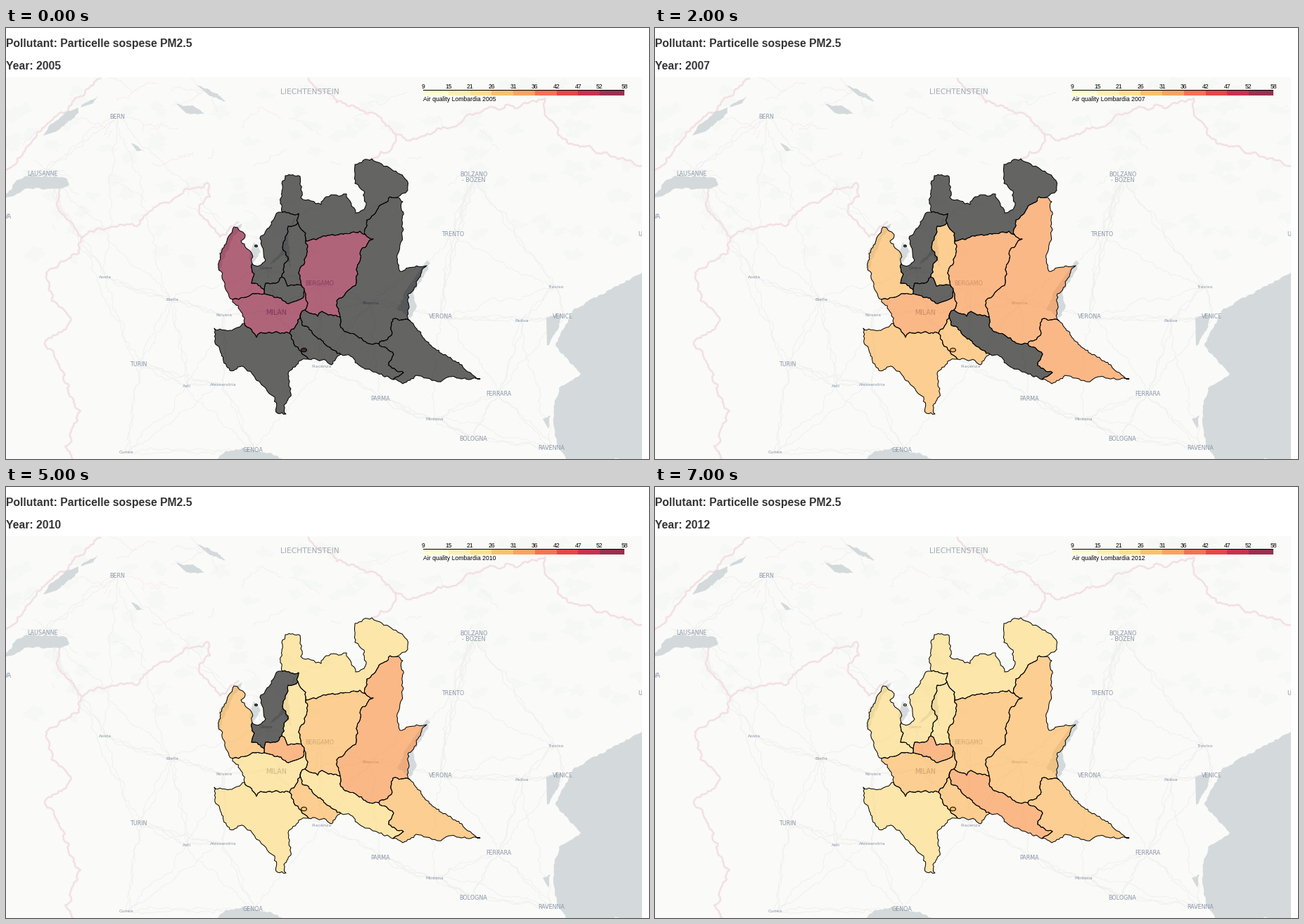
A matplotlib script for the animation above (8 s loop, 914 px wide and 613 px high).

```python
import numpy as np
import matplotlib.pyplot as plt
from matplotlib.animation import FuncAnimation
from matplotlib.patches import Polygon, Rectangle

W, H, DPI = 914, 613, 64
MAP_TOP, MAP_RIGHT = 70, 904
PT = 72 / DPI  # points per pixel
RAMP = ["#ffffcc", "#ffeda0", "#fed976", "#feb24c", "#fd8d3c",
        "#fc4e2a", "#e31a1c", "#bd0026", "#800026"]
INK = "#8b97a9"
rng = np.random.default_rng(5)

fig = plt.figure(figsize=(W / DPI, H / DPI), dpi=DPI, facecolor="white")
ax = fig.add_axes([0, 0, 1, 1])
ax.set_xlim(0, W)
ax.set_ylim(H, 0)
ax.axis("off")


def rough(flat, limit=2, fine=5):
    """Jagged line: displace midpoints until every step is short."""
    pts = np.array(flat, float).reshape(-1, 2)
    while True:
        step = np.diff(pts, axis=0)
        size = np.hypot(*step.T)
        if size.max() < fine:
            return pts
        out = [pts[0]]
        for p, q, d, s in zip(pts, pts[1:], step, size):
            if s >= fine:
                shift = rng.uniform(-1, 1) * min(0.25 * s, limit)
                out.append((p + q) / 2 + shift * np.array([-d[1], d[0]]) / s)
            out.append(q)
        pts = np.array(out)


def area(pts, color, z, **kw):
    return ax.add_patch(Polygon(pts, closed=True, fc=color, zorder=z, **kw))


def line(pts, color, width, z, **kw):
    ax.plot(*np.asarray(pts).T, color=color, lw=width * PT, zorder=z, **kw)


def text(x, y, s, px, color, font="DejaVu Sans", z=1.5, **kw):
    """Text whose capitals are centred on y."""
    return ax.text(x, y + 0.36 * px, s, fontsize=px * PT, color=color,
                   family=font, va="baseline", zorder=z, **kw)


def box(x, y, w, h, color, z, **kw):
    ax.add_patch(Rectangle((x, y), w, h, fc=color, lw=0, zorder=z, **kw))


# ---- base map -------------------------------------------------------------
box(0, MAP_TOP, MAP_RIGHT, H - MAP_TOP, "#fafaf8", 0)

CITIES = {"BERN": (158, 126), "LAUSANNE": (52, 207), "BOLZANO": (665, 208),
          "- BOZEN": (665, 216), "TRENTO": (635, 293), "BERGAMO": (446, 363),
          "VERONA": (618, 410), "VENICE": (792, 410), "TURIN": (188, 478),
          "PARMA": (532, 527), "FERRARA": (700, 520), "BOLOGNA": (664, 584),
          "RAVENNA": (775, 597), "GENOA": (351, 600)}
TOWNS = {"Como": (370, 341), "Brescia": (518, 391), "Aosta": (141, 354),
         "Biella": (236, 386), "Novara": (310, 408), "Asti": (257, 509),
         "Alessandria": (309, 507), "Piacenza": (449, 481),
         "Cuneo": (171, 603), "Modena": (609, 556), "Padua": (733, 416),
         "Treviso": (781, 368)}
MILAN = (384, 404.5)

# pale woodland and valley lines over the mountains
angle = np.linspace(0, 2 * np.pi, 12)
for _ in range(120):
    x, y = rng.uniform(0, MAP_RIGHT), rng.uniform(75, 330)
    r = rng.uniform(3, 12, 12)
    area(np.c_[x + 1.5 * r * np.cos(angle), y + r * np.sin(angle)], "#f6f8f5", 0.2)
for _ in range(30):
    x, y = rng.uniform(20, 850), rng.uniform(80, 300)
    end = x + rng.uniform(-60, 60), y + rng.uniform(-30, 30)
    line(rough([x, y, *end], 4), "#eeeff0", 0.8, 0.4)
for _ in range(12):
    x, y = rng.uniform(90, 400), rng.uniform(80, 190)
    end = x + rng.uniform(-70, 70), y + rng.uniform(-40, 40)
    line(rough([x, y, *end], 6), "#f3e2e3", 0.8, 0.6, ls=(0, (3, 2)))

# roads join each town to its nearest neighbours
places = np.array([*CITIES.values(), *TOWNS.values(), MILAN])
for p in places:
    near = np.argsort(np.hypot(*(places - p).T))[1:5]
    for q in places[near]:
        line(rough([*p, *q], 4, 8), "#efefed", 0.9, 0.5)


def border(*flat):
    shape = rough(flat, 4)
    line(shape, "#f7ebec", 3, 0.7)
    line(shape, "#f1dcdf", 1.3, 0.8)


def water(*flat):
    area(rough(flat, 1.5), "#d4dadc", 0.9, lw=0)


border(134, 72, 104, 98, 42, 156, 0, 202)
border(74, 214, 75, 260, 108, 298, 104, 320, 57, 348, 65, 388, 92, 412, 55, 450,
       70, 470, 106, 545, 84, 595, 95, 613)
border(108, 298, 130, 285, 186, 282, 210, 255, 286, 220, 290, 240, 275, 256,
       304, 297, 330, 276)
border(430, 72, 470, 106, 518, 120, 553, 150, 575, 160, 640, 140, 668, 121,
       766, 100, 772, 130, 800, 165, 850, 177, 904, 196)
border(553, 150, 548, 172, 520, 186)

water(904, 348, 888, 357, 840, 383, 808, 399, 781, 452, 817, 492, 786, 512,
      779, 542, 780, 580, 796, 614, 904, 614)
water(768, 412, 790, 407, 784, 430, 769, 452)
water(763, 556, 774, 551, 771, 570)
water(298, 614, 316, 602, 336, 597, 372, 605, 394, 614)
water(0, 236, 16, 216, 36, 209, 84, 213, 90, 223, 76, 229, 30, 228, 0, 241)
water(53, 153, 60, 141, 88, 118, 103, 113, 103, 121, 72, 147)
water(106, 113, 130, 97, 124, 107)
water(178, 164, 197, 175, 186, 175)
water(270, 80, 296, 92, 312, 104, 290, 97)
water(242, 108, 268, 112, 282, 122, 256, 121)
water(598, 331, 603, 335, 579, 378, 584, 395, 575, 412, 556, 400, 566, 376)
water(340, 276, 322, 298, 304, 346, 300, 340, 303, 320, 324, 284)
water(410, 270, 399, 292, 405, 340, 395, 322, 374, 340, 393, 312)
water(352, 305, 362, 318, 350, 334, 346, 324)

for names, px in ((CITIES, 8), (TOWNS, 6.4)):
    for name, (x, y) in names.items():
        text(x, y, name, px, INK, ha="center")
text(*MILAN, "MILAN", 9.5, "#7f8b9d", ha="center")
text(431.5, 89.9, "LIECHTENSTEIN", 10.8, "#a3abb5", ha="center")
text(8, 267.5, "VA", 8.6, INK, ha="right")
text(898.5, 293, "U", 8, INK)

# ---- provinces: shared edges between named corner points -------------------
NODES = {"a": (393, 262), "b": (415, 277), "c": (426, 303), "d": (511, 294),
         "e": (556, 241), "f": (350, 335), "g": (367, 372), "h": (367, 378),
         "i": (322, 386), "j": (339, 420), "k": (392, 354), "l": (421, 368),
         "m": (424, 374), "n": (425, 401), "o": (419, 406), "p": (403, 434),
         "q": (430, 471), "r": (476, 464), "s": (475, 411), "t": (530, 449),
         "u": (550, 500), "v": (574, 416)}
edges = {}


def edge(ends, *flat):
    start, stop = ends
    pts = rough([*NODES[start], *flat, *NODES[stop]])
    edges[ends], edges[stop + start] = pts, pts[::-1]


# outer edges
edge("ae", 392, 221, 397, 210, 418, 211, 419, 241, 448, 251, 455, 240, 484, 236,
     497, 263, 511, 254, 509, 232, 496, 221, 496, 194, 520, 186, 548, 201,
     570, 217, 571, 231)
edge("ev", 564, 247, 565, 287, 556, 323, 560, 346, 598, 338, 572, 378)
edge("vu", 582, 426, 610, 456, 648, 479, 674, 499, 630, 496, 613, 503, 583, 494,
     564, 506)
edge("ur", 505, 482, 490, 467)
edge("rq", 463, 479, 455, 473)
edge("qj", 416, 474, 401, 492, 405, 520, 395, 537, 398, 549, 386, 548, 382, 525,
     350, 492, 338, 482, 318, 487, 298, 450, 296, 427, 318, 430)
edge("ji", 336, 406)
edge("if", 302, 341, 304, 321, 324, 283, 340, 294, 334, 303, 350, 322)
edge("fa", 360, 338, 369, 330, 361, 299, 387, 262)
# inner edges
edge("ab", 416, 264)
edge("bc", 426, 292)
edge("cd", 455, 296, 503, 289)
edge("de", 513, 273, 546, 240)
edge("bk", 401, 282, 393, 312, 401, 326)
edge("kg", 383, 363, 369, 363)
edge("fg", 353, 350, 349, 363)
edge("cl", 426, 326, 418, 352)
edge("kl", 400, 367)
edge("lm")
edge("mh", 422, 384, 404, 391)
edge("gh")
edge("hi", 355, 378)
edge("ds", 522, 300, 505, 315, 497, 366, 470, 388)
edge("ns", 443, 410, 449, 403)
edge("mn", 429, 391)
edge("no")
edge("op", 411, 425)
edge("pj", 362, 433, 356, 440)
edge("or", 424, 424, 442, 440)
edge("pq", 409, 449)
edge("st", 476, 426, 513, 448)
edge("tu", 551, 464, 544, 480, 565, 490)
edge("tv", 548, 437, 550, 414)

# corners around VA, CO, SO, LC, BG, BS, MB, MI, LO, PV, CR, MN
RINGS = ["fghif", "abkgfa", "aedcba", "bclkb", "cdsnmlc", "evtsde", "klmhgk",
         "ihmnopji", "orqpo", "jpqj", "nsturon", "tvut"]
EXCLAVES = {1: (355.5, 310, 2), 7: (423.5, 458, 4)}


def province(i, ring):
    parts = [np.vstack([edges[a + b] for a, b in zip(ring, ring[1:])])]
    if i in EXCLAVES:
        x, y, r = EXCLAVES[i]
        parts.append(np.c_[x + r * np.cos(angle), y + 0.7 * r * np.sin(angle)])
    for p in parts:
        area(p, "none", 3, ec="black", lw=PT, joinstyle="round")
    return [area(p, "black", 2, alpha=0.6, lw=0) for p in parts]


provinces = [province(i, ring) for i, ring in enumerate(RINGS)]

# colour class per province in the order of RINGS; '-' means no data
YEARS = ["8---8--8----", "4--544-533-6", "3--344-433-4", "3-52348423-3",
         "3-3234533233", "3-2234423223", "342334543133", "222233433243"]

# ---- legend and headings --------------------------------------------------
stops = [593, *(629 + 30.7 * np.arange(8)), 879]
for x0, x1, color in zip(stops, stops[1:], RAMP):
    box(x0, 88.5, x1 - x0, 7.2, color, 5, alpha=0.8)
box(593, 87.6, 286, 1, "black", 6)
SMALL = dict(px=8.58, color="black", font="Liberation Sans", z=6)
for x, label in zip(stops, "9 15 21 26 31 36 42 47 52 58".split()):
    text(x, 82.9, label, ha="center", **SMALL)
caption = text(593, 100.7, "", **SMALL)

box(MAP_RIGHT, 0, W - MAP_RIGHT, H, "white", 8)
box(0, 0, W, MAP_TOP, "white", 8)
HEAD = dict(px=15.73, color="#333333", font="Liberation Sans", z=9, weight="bold")
text(0, 21.5, "Pollutant: Particelle sospese PM2.5", **HEAD)
heading = text(0, 53, "", **HEAD)


def draw(i):
    heading.set_text(f"Year: {2005 + i}")
    caption.set_text(f"Air quality Lombardia {2005 + i}")
    for patches, level in zip(provinces, YEARS[i]):
        for patch in patches:
            patch.set_facecolor("black" if level == "-" else RAMP[int(level)])
    return [heading, caption]


anim = FuncAnimation(fig, draw, frames=len(YEARS), interval=1000,
                     repeat=True, repeat_delay=0)
plt.show()
```
